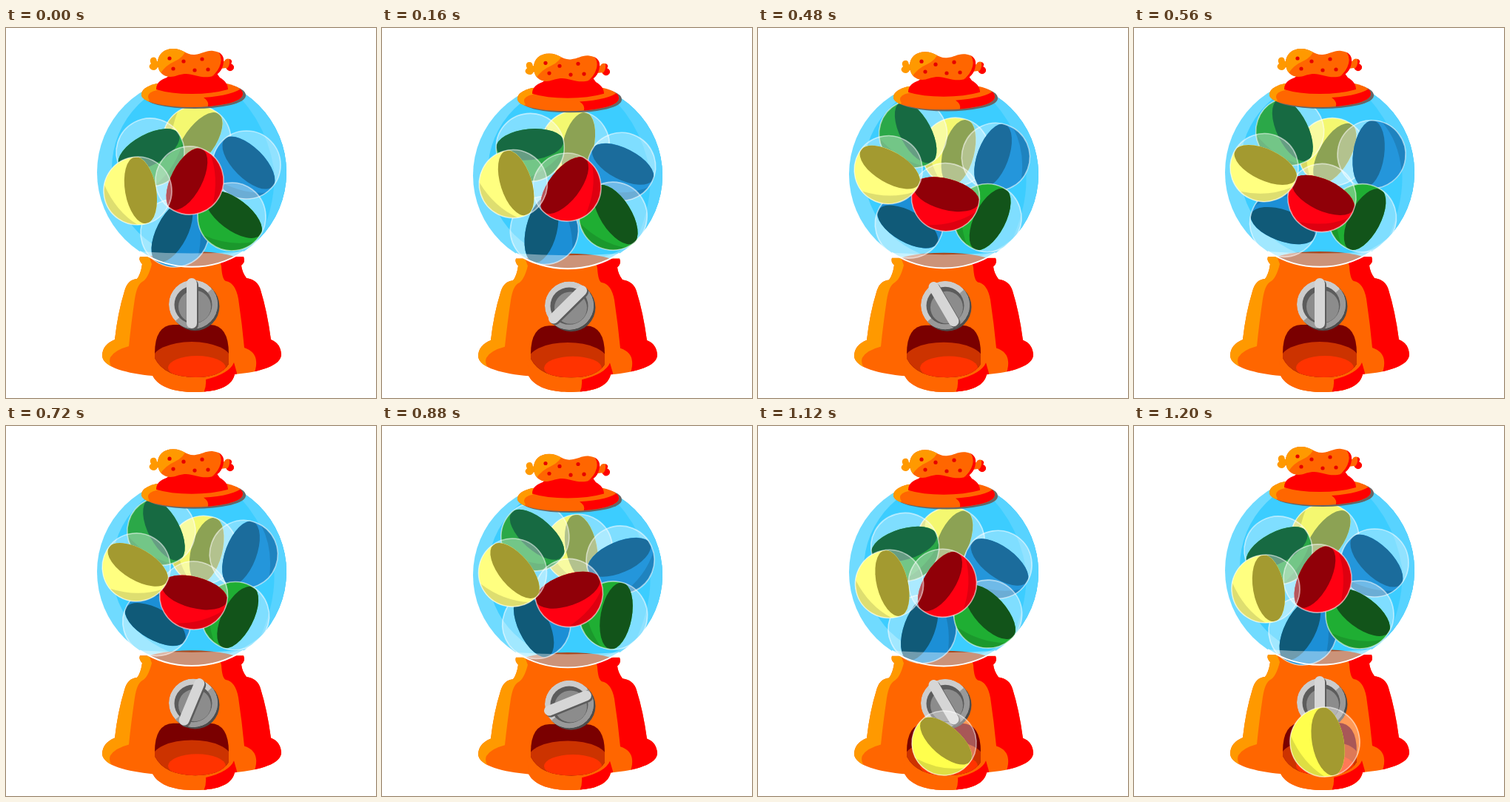
Animation, 500 px wide and 500 px high, one loop 1360 ms. Source, as an HTML page:

```html
<!DOCTYPE html>
<html lang="en">
<head>
<meta charset="utf-8">
<title>Capsule machine</title>
<style>
  html, body { margin: 0; width: 100%; height: 100%; overflow: hidden; background: #fff; }
  svg { display: block; width: 100vw; height: 100vh; }
</style>
</head>
<body>
<svg viewBox="0 0 500 500">
  <defs>
    <path id="baseShape" d="M181 309 Q179 314 184 319 Q182 333 177 339 Q164 340 160 356 Q151 385 147 421 Q130 428 130 443 C131 459 165 467 198 470 C207 486 229 492 254 492 C283 492 305 486 309 468 C344 465 372 456 372 441 Q371 426 358 421 Q353 383 344 354 Q340 340 325 338 Q319 330 318 321 Q324 316 321 309 Z"/>
    <clipPath id="baseClip"><use href="#baseShape"/></clipPath>
    <path id="mouthShape" d="M201 440 Q201 402 226 401 H276 Q301 402 301 440 V454 Q290 472 256 472 Q214 472 201 446 Z"/>
    <clipPath id="mouthClip"><use href="#mouthShape"/></clipPath>
    <clipPath id="globeClip"><circle cx="251" cy="195" r="128"/></clipPath>
    <path id="rimShape" d="M183 90 Q183 80 204 75 H298 Q320 80 320 89 Q320 97 300 102 Q277 107 251 107 Q222 107 201 102 Q183 97 183 90 Z"/>
    <clipPath id="rimClip"><use href="#rimShape"/></clipPath>
    <path id="candyShape" d="M205 47 C205 36 213 28 226 28 C239 28 244 37 255 36 C266 35 270 30 280 31 C291 32 295 39 294 46 C293 57 286 65 275 66 C262 68 252 61 241 62 C231 63 226 68 216 65 C208 62 205 55 205 47 Z"/>
    <clipPath id="candyClip"><use href="#candyShape"/></clipPath>
    <clipPath id="knobClip"><circle cx="253" cy="373.500" r="33"/></clipPath>
  </defs>

  <g class="squash">
    <use href="#baseShape" fill="#ff6600"/>
    <g clip-path="url(#baseClip)">
      <path fill="#ff9900" d="M120 300 H190 L197 319 Q192 339 184 343 Q177 347 174 366 Q169 400 166 430 Q147 435 141 445 Q137 455 150 466 L120 470 Z"/>
      <path fill="#ff0000" d="M286 300 L291 322 Q292 340 297 342 Q310 344 314 366 Q319 400 322 432 Q337 437 338 450 Q339 459 334 470 H390 V300 Z"/>
      <path fill="#ff6600" d="M196 450 H301 L309 468 L300 500 H205 Z"/>
      <path fill="#ff0000" d="M308 452 Q302 467 270 475 Q271 486 266 495 H306 L312 466 Z"/>
    </g>
    <use href="#mouthShape" fill="#7a0000"/>
    <g clip-path="url(#mouthClip)">
      <ellipse cx="251" cy="449" rx="54" ry="25" fill="#cc3300"/>
      <ellipse cx="258" cy="459" rx="39" ry="16" fill="#ff3300"/>
    </g>
    <circle cx="255.500" cy="376" r="33" fill="#4d4d4d"/>
    <g clip-path="url(#knobClip)">
      <circle cx="253" cy="373.500" r="33" fill="#cccccc"/>
      <path fill="#999999" d="M281 350 L222 402 L260 420 L295 395 V350 Z"/>
    </g>
    <circle cx="253" cy="374" r="25.500" fill="#5c5c5c"/>
    <circle cx="255" cy="376.500" r="22" fill="#8c8c8c"/>
    <g id="handle">
      <rect x="-34" y="-7" width="68" height="14" rx="7" fill="#5c5c5c" id="handleShade"/>
      <rect x="-34" y="-7" width="68" height="14" rx="7" fill="#d6d6d6"/>
    </g>

    <circle cx="251" cy="195" r="128" fill="#70dbff"/>
    <g clip-path="url(#globeClip)">
      <circle cx="265" cy="190" r="122" fill="#3ccdff"/>
      <path fill="#58d3ff" d="M290 70 Q350 116 362 190 Q366 236 340 292 L400 260 V70 Z"/>
      <ellipse cx="251" cy="316" rx="66" ry="14" fill="#a84a20"/>
    </g>
  </g>

  <g id="balls"></g>

  <g class="squash">
    <path d="M181 302 Q251 307 321 302 A128 128 0 0 1 181 302 Z" fill="#fff" fill-opacity=".4"/>
    <path d="M181 302 A128 128 0 0 0 321 302" fill="none" stroke="#fff" stroke-width="2"/>
    <use href="#rimShape" x="4" y="2" fill="#666"/>
    <g clip-path="url(#rimClip)">
      <rect x="180" y="70" width="145" height="40" fill="#ff6600"/>
      <path fill="#ff9900" d="M180 70 H222 L204 84 Q187 88 194 98 L180 106 Z"/>
      <path fill="#ff0000" d="M322 78 Q311 91 267 94 Q276 100 272 108 H325 Z"/>
    </g>
    <path fill="#ff0000" d="M203 83 C203 74 209 70 217 67 L226 60 H284 L289 67 C296 71 300 76 300 83 Q279 89 251 89 Q222 89 203 83 Z"/>
    <path fill="#ff9900" d="M210 44 L204 45 Q203 38 197 40 Q193 43 196 48 Q191 52 196 56 Q202 59 205 53 L211 54 Z"/>
    <path fill="#ff6600" d="M289 44 L295 45 Q297 40 303 42 Q307 45 304 48 Q310 51 307 56 Q302 61 297 54 L290 55 Z"/>
    <path fill="#ff0000" d="M302 42 Q307 44 304 48 Q310 51 307 56 Q302 61 298 55 Q303 52 302 42 Z"/>
    <use href="#candyShape" fill="#ff6600"/>
    <g clip-path="url(#candyClip)">
      <path fill="#ff9900" d="M200 25 H245 Q242 39 228 45 Q216 50 208 62 L200 60 Z"/>
      <path fill="#ff0000" d="M282 28 Q293 35 290 48 Q287 60 275 68 L300 68 V28 Z"/>
    </g>
    <g id="dots" fill="#e60000"></g>
  </g>

  <g id="prize"></g>
</svg>
<script>
const STEP = 80, LOOP = 1360, LAST = 15;
const $ = id => document.getElementById(id);
const NS = "http://www.w3.org/2000/svg";

// Per-step progress: downward press, travel between poses, turn between poses.
const press = [0, 3.25, 6.5, 9.75, 13, 8.7, 4.3, 0, 0, 3.25, 6.5, 9.75, 13, 8.7, 4.3, 0];
const travel = [0, .16, .33, .5, .65, .79, .91, .98, .98, .93, .85, .74, .6, .44, .23, 0];
const turn = [0, .04, .14, .28, .43, .67, .9, 1, 1, .9, .73, .54, .36, .2, .07, 0];

// Handle angle: half a turn per press, faster on the way back.
function handleAngle(k) {
  const i = k % 8, half = k < 8 ? -90 : 90;
  return half + (i < 4 ? i * 22.5 : 90 + (i - 4) * 30);
}

const paint = {
  yellow: ["#ffff80", "#a39a30"],
  gold: ["#ffff4d", "#a39a30"],
  red: ["#ff0012", "#900008"],
  green: ["#1fae33", "#12541a"],
  blue: ["#1c8fd6", "#105a78"],
  lemon: ["#f4f870", "#8ca254"],
  leaf: ["#2ba848", "#176a42"],
  sky: ["#2496db", "#1b6c9c"]
};

// from/to: x, y, angle; bow bends the path between them.
const balls = [
  { c: "lemon", from: [258, 151, 35], to: [268, 168, 30], bow: [0, 0, -44] },
  { c: "leaf", from: [195, 168, -118], to: [211, 139, -26], bow: [0, 2, 20] },
  { c: "sky", from: [325, 185, -45], to: [321, 170, -172], bow: [0, 7, 0] },
  { c: "blue", from: [228, 277, 207], to: [202, 263, 110], bow: [0, 0, 0] },
  { c: "green", from: [305, 255, -53], to: [308, 257, 28], bow: [7, -3, 20] },
  { c: "red", from: [248, 206, 207], to: [254, 230, 295], bow: [0, 0, -4] },
  { c: "yellow", from: [178, 220, -10], to: [176, 188, -65], bow: [0, 0, 0] }
];

// A capsule around 0,0 whose clear half faces right.
function capsule(parent, color) {
  const [body, inside] = paint[color];
  const g = document.createElementNS(NS, "g");
  g.innerHTML = `
    <circle r="46" fill="#fff" fill-opacity=".34"/>
    <path fill="${body}" d="M4 -45.8 A46 46 0 1 0 4 45.8 A21 45.8 0 0 0 4 -45.8 Z"/>
    <path fill="#000" fill-opacity=".13" d="M-43 -16 A46 46 0 0 0 -8 45.3 Q-34 22 -43 -16 Z"/>
    <ellipse cx="4" rx="21" ry="45.5" fill="${inside}"/>
    <circle r="46" fill="none" stroke="#fff" stroke-opacity=".55" stroke-width="1.6"/>`;
  parent.append(g);
  return g;
}

balls.forEach(b => b.el = capsule($("balls"), b.c));
const prize = capsule($("prize"), "gold");

for (const [x, y] of [[221, 41], [240, 45], [265, 42], [226, 55], [255, 57], [273, 56]]) {
  const dot = document.createElementNS(NS, "circle");
  dot.setAttribute("cx", x);
  dot.setAttribute("cy", y);
  dot.setAttribute("r", 2.6);
  $("dots").append(dot);
}

const place = (el, x, y, a, s = 1) =>
  el.setAttribute("transform", `translate(${x} ${y}) rotate(${a}) scale(${s})`);

function pose(k) {
  const down = press[k], s = 1 - down / 464;
  document.querySelectorAll(".squash").forEach(g =>
    g.setAttribute("transform", `translate(0 ${492 * (1 - s)}) scale(1 ${s})`));

  const a = handleAngle(k), rad = a * Math.PI / 180;
  place($("handle"), 251, 372, a);
  // Keep the handle's shadow falling to the lower right.
  const dx = 2 * Math.cos(rad) + 2 * Math.sin(rad);
  const dy = 2 * Math.cos(rad) - 2 * Math.sin(rad);
  $("handleShade").setAttribute("transform", `translate(${dx} ${dy})`);

  const steps = [travel[k], travel[k], turn[k]];
  for (const b of balls) {
    const [x, y, r] = steps.map((p, i) =>
      b.from[i] + (b.to[i] - b.from[i]) * p + b.bow[i] * 4 * p * (1 - p));
    place(b.el, x, y + .18 * down, r);
  }

  const left = LAST - k;
  $("prize").style.display = left <= 3 ? "" : "none";
  place(prize, 258 - 6.5 * left, 427 + 1.5 * left, -10 - 39 * left, (47 - 3.5 * left) / 46);
}

let shown = -1;
function tick() {
  const k = Math.min(LAST, Math.floor(performance.now() % LOOP / STEP));
  if (k !== shown) pose(shown = k);
  requestAnimationFrame(tick);
}
tick();
</script>
</body>
</html>
```
